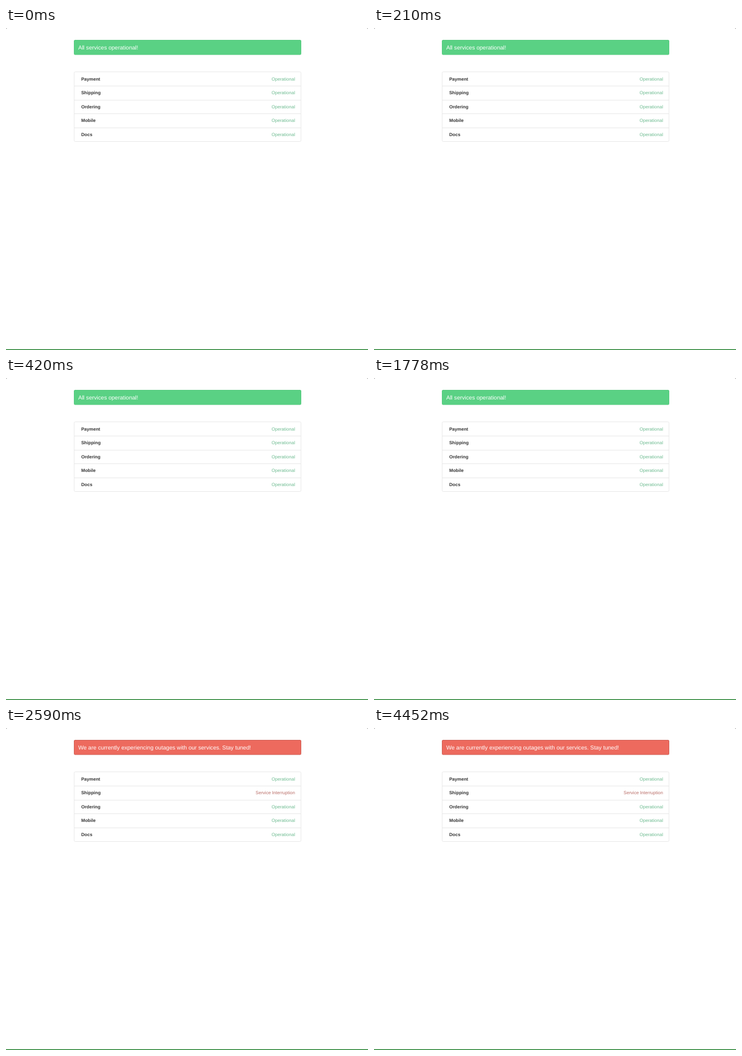
These frames come from a looping animation (640x569 px, 5600 ms). An HTML page:

```html
<!DOCTYPE html>
<html lang="en">
<head>
<meta charset="utf-8">
<title>Service status</title>
<style>
  html, body { margin: 0; width: 100%; height: 100%; overflow: hidden; background: #fff; }
  svg { display: block; width: 100vw; height: 100vh; }
  text { font: 8.04px "Liberation Sans", Arial, sans-serif; text-rendering: geometricPrecision; }
  .name { font-weight: bold; fill: #333; }
  .state { text-anchor: end; }
  #message { font-size: 10.04px; fill: #fff; }
  .line { fill: none; stroke: #e8e8e8; }
</style>
</head>
<body>
<svg viewBox="0 0 640 569">
  <path d="M0 0h2L0 2zM640 0h-2l2 2z" fill="#aaa"/>
  <rect id="banner" x="120.5" y="21.5" width="401" height="25.5" rx="1.5"/>
  <text id="message" x="127.7" y="37.8"></text>
  <rect class="line" x="120.5" y="77.5" width="401" height="123" rx="2"/>
  <g id="rows"></g>
  <rect y="567.7" width="640" height="1.3" fill="#0b7318"/>
</svg>
<script>
const LOOP = 5600, OUTAGE_AT = 2590;
const $ = id => document.getElementById(id);

$("rows").innerHTML = ["Payment", "Shipping", "Ordering", "Mobile", "Docs"].map((name, i) => {
  const y = 92.7 + 24.5 * i;
  const divider = i ? `<path class="line" d="M121 ${Math.floor(78 + 24.5 * i) + 0.5}H521"/>` : "";
  return `${divider}<text class="name" x="133" y="${y}">${name}</text>
    <text class="state" x="511" y="${y}" fill="#6dbb90">Operational</text>`;
}).join("");

const shipping = document.querySelectorAll(".state")[1];
let shown;

function show(outage) {
  $("banner").setAttribute("fill", outage ? "#ed6a5e" : "#5ad184");
  $("banner").setAttribute("stroke", outage ? "#cf5f55" : "#56ca7f");
  $("message").textContent = outage
    ? "We are currently experiencing outages with our services. Stay tuned!"
    : "All services operational!";
  shipping.textContent = outage ? "Service Interruption" : "Operational";
  shipping.setAttribute("fill", outage ? "#b96c66" : "#6dbb90");
}

function tick() {
  const outage = performance.now() % LOOP >= OUTAGE_AT;
  if (outage !== shown) show(shown = outage);
  requestAnimationFrame(tick);
}
tick();
</script>
</body>
</html>
```
